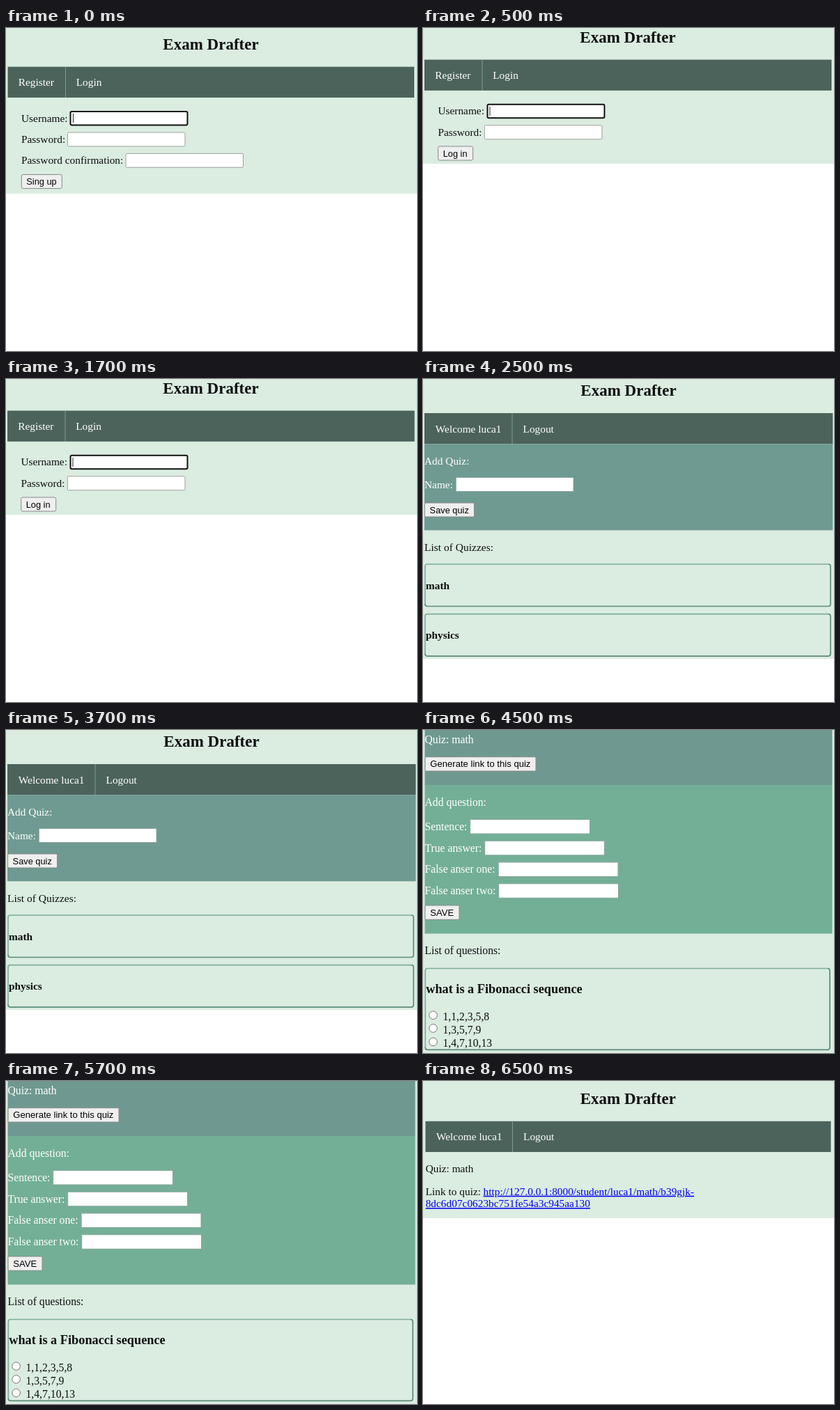
These frames come from a looping animation (590 px wide and 464 px high, 8 s). An HTML page:

```html
<!DOCTYPE html>
<html lang="en">
<head>
<meta charset="utf-8">
<title>Exam Drafter</title>
<style>
html, body { margin: 0; width: 100%; height: 100%; overflow: hidden; background: #fff; }
svg { display: block; width: 590px; height: 464px; }
text { font: 15.36px "Liberation Serif", "Times New Roman", serif; fill: #0c0f0e; }
.title { font-size: 23px; font-weight: bold; text-anchor: middle; }
.light text, text.light { fill: #fff; }
.bold { font-weight: bold; }
.button text, text.button { font: 12.8px "Liberation Sans", Arial, sans-serif; fill: #000; }
.page { fill: #dbece1; }
.nav { fill: #4c635c; }
.sep { fill: #7f9a92; }
.field { fill: #fff; stroke: #9aa29e; }
.plain { fill: #fff; stroke: #8aa69f; }
.push { fill: #efefef; stroke: #878b89; }
.focus { fill: #fff; stroke: #101010; stroke-width: 2; }
.caret { fill: #222; }
.edge { fill: none; stroke-width: 1.7; }
.lit { stroke: #7dac9c; }
.dim { stroke: #5c8b79; }
.radio { fill: #fff; stroke: #767676; }
.link text, text.link { fill: #00e; text-decoration: underline; }
.large text { font-size: 15.7px; }
.large text.button { font-size: 13.1px; }
.large text.question { font-size: 18.3px; }

.scene { visibility: hidden; animation: 8s step-end infinite; }
#register { animation-name: register; }
#login { animation-name: login; }
#quizzes { animation-name: quizzes; }
#questions { animation-name: questions; }
#share { animation-name: share; }
@keyframes register { 0% { visibility: visible } 6.25%, 100% { visibility: hidden } }
@keyframes login { 0% { visibility: hidden } 6.25% { visibility: visible } 31.25%, 100% { visibility: hidden } }
@keyframes quizzes { 0% { visibility: hidden } 31.25% { visibility: visible } 56.25%, 100% { visibility: hidden } }
@keyframes questions { 0% { visibility: hidden } 56.25% { visibility: visible } 81.25%, 100% { visibility: hidden } }
@keyframes share { 0% { visibility: hidden } 81.25%, 100% { visibility: visible } }
</style>
</head>
<body>
<svg viewBox="0 0 590 464">
  <defs>
    <g id="card">
      <path class="edge lit" d="M3 324V269Q3 266 6 266H582"/>
      <path class="edge dim" d="M3 323Q3 326.5 6 326.5H582Q585 326.5 585 323.5V269Q585 266 582 266"/>
    </g>
  </defs>

  <g id="register" class="scene">
    <rect class="page" width="590" height="238"/>
    <text class="title" x="294" y="31.3">Exam Drafter</text>
    <rect class="nav" x="2.5" y="55.7" width="583.5" height="44.3"/>
    <rect class="sep" x="85" y="55.7" width="1" height="44.3"/>
    <text class="light" x="17.7" y="83.2">Register</text>
    <text class="light" x="100.7" y="83.2">Login</text>
    <text x="22" y="134.7">Username:</text>
    <rect class="focus" x="92.5" y="120" width="168" height="19.5" rx="2"/>
    <rect class="caret" x="96" y="123" width="1" height="13"/>
    <text x="22" y="165">Password:</text>
    <rect class="field" x="88.5" y="150" width="168.5" height="20" rx="1.5"/>
    <text x="22" y="195.3">Password confirmation:</text>
    <rect class="field" x="172" y="180.3" width="168.5" height="20" rx="1.5"/>
    <rect class="push" x="22.3" y="210.5" width="58" height="20" rx="2.5"/>
    <text class="button" x="29.3" y="225">Sing up</text>
  </g>

  <g id="login" class="scene">
    <rect class="page" width="590" height="195"/>
    <text class="title" x="294" y="21">Exam Drafter</text>
    <rect class="nav" x="2" y="45.5" width="584.5" height="44.3"/>
    <rect class="sep" x="84.5" y="45.5" width="1" height="44.3"/>
    <text class="light" x="17.2" y="73">Register</text>
    <text class="light" x="100.2" y="73">Login</text>
    <text x="21.4" y="124.4">Username:</text>
    <rect class="focus" x="92.5" y="109.8" width="168" height="19.5" rx="2"/>
    <rect class="caret" x="95.5" y="113" width="1" height="13"/>
    <text x="21.4" y="154.8">Password:</text>
    <rect class="field" x="88.3" y="139.8" width="168.7" height="20" rx="1.5"/>
    <rect class="push" x="21.7" y="170" width="50" height="20" rx="2.5"/>
    <text class="button" x="28.7" y="184.7">Log in</text>
  </g>

  <g id="quizzes" class="scene">
    <rect class="page" width="590" height="402"/>
    <text class="title" x="295" y="24.3">Exam Drafter</text>
    <rect class="nav" x="2" y="49" width="586.3" height="44.3"/>
    <rect class="sep" x="127.5" y="49" width="1" height="44.3"/>
    <text class="light" x="17.8" y="76.5">Welcome luca1</text>
    <text class="light" x="143.5" y="76.5">Logout</text>
    <rect x="2" y="93.3" width="586.3" height="124" fill="#6f9a91"/>
    <text class="light" x="2" y="122.7">Add Quiz:</text>
    <text class="light" x="2" y="156.6">Name:</text>
    <rect class="plain" x="47.3" y="141.5" width="168.7" height="20"/>
    <rect class="push" x="2.5" y="178" width="71" height="20" rx="1.5"/>
    <text class="button" x="9.6" y="192.5">Save quiz</text>
    <text x="2" y="247" style="font-size:15.5px">List of Quizzes:</text>
    <use href="#card"/>
    <text class="bold" x="4" y="302">math</text>
    <use href="#card" y="71.6"/>
    <text class="bold" x="4" y="373.4">physics</text>
  </g>

  <g id="questions" class="scene large">
    <rect class="page" width="590" height="464"/>
    <rect x="2.5" width="585" height="79" fill="#6f9990"/>
    <rect x="2.5" y="79" width="585" height="213.5" fill="#73af96"/>
    <g class="light">
      <text x="2.5" y="19">Quiz: math</text>
      <text x="2.5" y="109">Add question:</text>
      <text x="2.5" y="143.7">Sentence:</text>
      <text x="2.5" y="174.6">True answer:</text>
      <text x="2.5" y="205.3">False anser one:</text>
      <text x="2.5" y="236">False anser two:</text>
    </g>
    <rect class="push" x="3" y="38.7" width="159" height="20.3" rx="1.5"/>
    <text class="button" x="10.3" y="53.4">Generate link to this quiz</text>
    <rect class="plain" x="67.7" y="128.5" width="171.8" height="20.5"/>
    <rect class="plain" x="88.7" y="159.3" width="171.8" height="20.5"/>
    <rect class="plain" x="108.2" y="190" width="171.8" height="20.5"/>
    <rect class="plain" x="108.7" y="220.8" width="171.8" height="20.5"/>
    <rect class="push" x="3" y="252" width="49" height="20.3" rx="1.5"/>
    <text class="button" x="10.2" y="266.8">SAVE</text>
    <text x="2.5" y="322.4">List of questions:</text>
    <path class="edge lit" d="M3.3 457V346Q3.3 342.5 6.3 342.5H581"/>
    <path class="edge dim" d="M3.3 456Q3.3 459.3 6.3 459.3H581Q584 459.3 584 456V346Q584 342.5 581 342.5"/>
    <text class="bold question" x="4.2" y="377.8">what is a Fibonacci sequence</text>
    <circle class="radio" cx="14.6" cy="409.7" r="5.8"/>
    <circle class="radio" cx="14.6" cy="428.5" r="5.8"/>
    <circle class="radio" cx="14.6" cy="448" r="5.8"/>
    <text x="28.5" y="416.5">1,1,2,3,5,8</text>
    <text x="28.5" y="435.5">1,3,5,7,9</text>
    <text x="28.5" y="454.6">1,4,7,10,13</text>
  </g>

  <g id="share" class="scene">
    <rect class="page" width="590" height="197"/>
    <text class="title" x="294.3" y="33.4">Exam Drafter</text>
    <rect class="nav" x="3.5" y="57.8" width="582" height="44.2"/>
    <rect class="sep" x="128" y="57.8" width="1" height="44.2"/>
    <text class="light" x="19" y="85.2">Welcome luca1</text>
    <text class="light" x="144" y="85.2">Logout</text>
    <text x="3.7" y="131.3">Quiz: math</text>
    <text x="3.7" y="163.8">Link to quiz:</text>
    <text class="link" x="86.6" y="163.8">http://127.0.0.1:8000/student/luca1/math/b39gjk-</text>
    <text class="link" x="3.7" y="181.2">8dc6d07c0623bc751fe54a3c945aa130</text>
  </g>
</svg>
</body>
</html>
```
